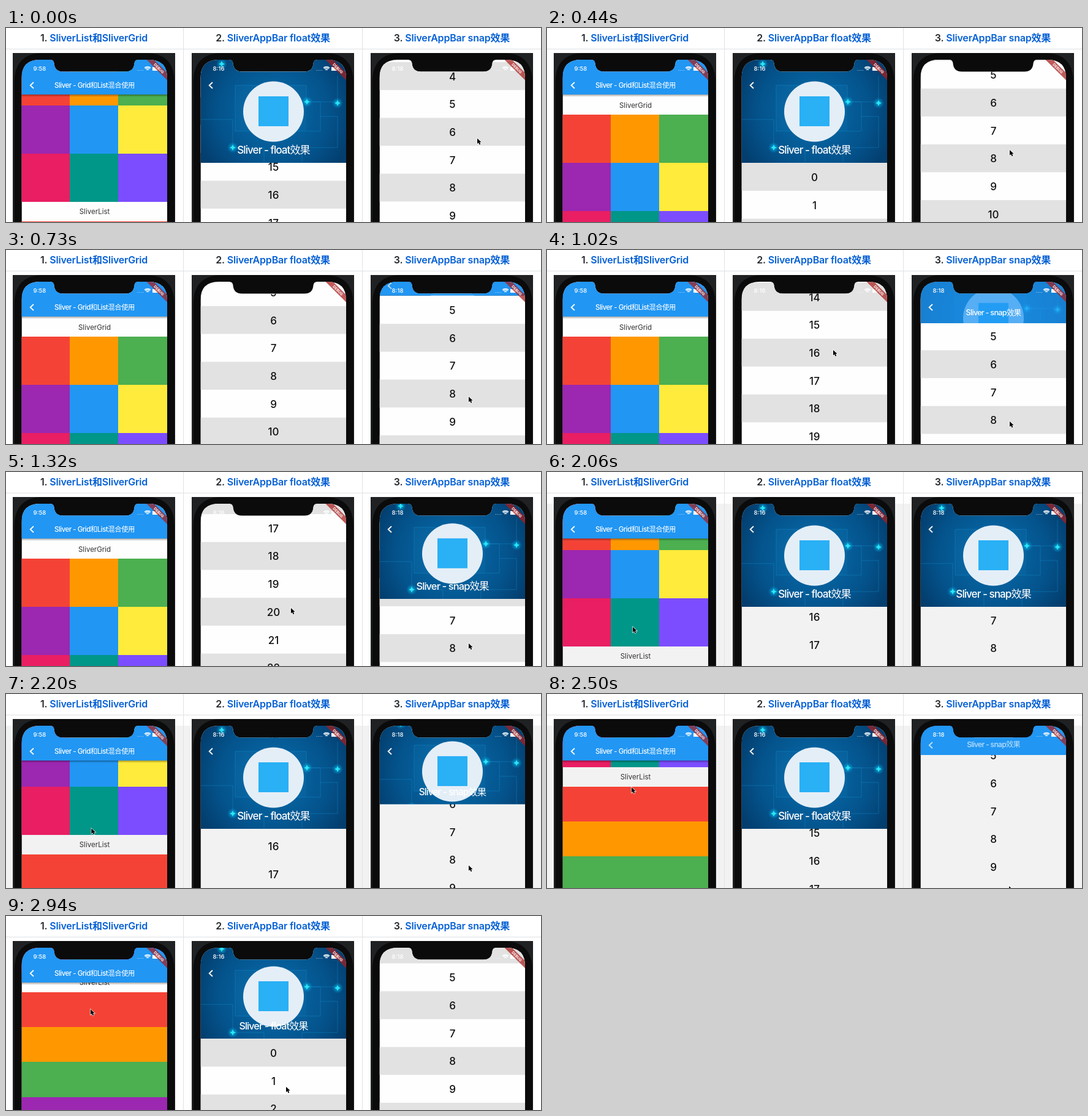
Write an HTML page with a canvas that moves like this. It is 873 px wide and 318 px high and loops after 3.04 s.

```html
<!DOCTYPE html>
<html lang="zh">
<head>
<meta charset="utf-8">
<title>Sliver demos</title>
<style>
  html, body { margin: 0; width: 100%; height: 100%; overflow: hidden; background: #fff; }
  canvas { display: block; width: 873px; height: 318px; }
</style>
</head>
<body>
<canvas id="stage"></canvas>
<script>
const W = 873, H = 318, LOOP = 3040, STEP = 147, LEAD = 9;
const FONT = 'Inter, "Noto Sans CJK SC", "Noto Sans CJK", sans-serif';
const COLORS = ['#f44336', '#ff9800', '#4caf50', '#9c27b0', '#2196f3',
  '#ffeb3b', '#e91e63', '#009688', '#7c4dff'];
const BLUE = '#2196f3', LINE = '#dfe2e5';
const TOP = 52, COLLAPSED = 110, EXPANDED = 221, ROW = 45.7;
const LEFT = 14.5, WIDTH = 237.5, MID = 133.5;

const canvas = document.getElementById('stage');
const ctx = canvas.getContext('2d');
const ratio = window.devicePixelRatio || 1;
canvas.width = W * ratio;
canvas.height = H * ratio;

const clamp = (v, low, high) => Math.min(high, Math.max(low, v));

// Values at a step along a path of [step, ...values] points.
function along(path, step) {
  const next = path.findIndex(p => p[0] >= step);
  const b = path.at(next), a = path[Math.max(0, next < 0 ? path.length - 1 : next - 1)];
  const k = a === b ? 0 : (step - a[0]) / (b[0] - a[0]);
  return a.slice(1).map((v, i) => v + (b[i + 1] - v) * k);
}

const gridScroll = step => along([[0, 94], [3, 0], [12, 0], [14, 93], [17, 259], [20, 286]], step)[0];
const floatScroll = step => along([[0, 702], [3, 0], [7, 807], [9, 929], [12, 929],
  [14, 738], [17, 702], [19, 0], [20, 20]], step)[0];
const snapScroll = step => along([[0, 348], [3, 396], [4, 396], [7, 331], [9, 321], [14, 321], [17, 372]], step)[0];

// A floating bar follows every scroll movement within its own height.
function floatBar(step) {
  let bottom = EXPANDED;
  for (let i = 1; i <= step; i++) {
    bottom = clamp(bottom + floatScroll(i - 1) - floatScroll(i), TOP, EXPANDED);
  }
  return bottom;
}
const snapBar = step => along([[4, TOP], [7, 120], [9, 208], [10, EXPANDED],
  [14, EXPANDED], [17, 100], [18, TOP]], Math.max(4, step))[0];

const gridPointer = [[[13, 129, 299], [14, 129, 254], [17, 127, 153], [20, 127, 153]]];
const floatPointer = [[[7, 164, 164], [9, 162, 223]], [[20, 154, 280]]];
const snapPointer = [[[0, 174, 181], [3, 160, 200], [7, 160, 281], [11, 160, 281]], [[15, 160, 281], [17, 159, 315]]];

function box(x, y, w, h, color) {
  ctx.fillStyle = color;
  ctx.fillRect(x, y, w, h);
}

function disc(x, y, r, color) {
  ctx.fillStyle = color;
  ctx.beginPath();
  ctx.arc(x, y, r, 0, Math.PI * 2);
  ctx.fill();
}

function label(text, x, y, size, color, { weight = 400, spacing = 0, align = 'center' } = {}) {
  ctx.font = `${weight} ${size}px ${FONT}`;
  ctx.letterSpacing = `${spacing * size}px`;
  ctx.textAlign = align;
  ctx.fillStyle = color;
  ctx.fillText(text, x, y + size * 0.36);
}

function line(d, color, width) {
  ctx.strokeStyle = color;
  ctx.lineWidth = width;
  ctx.stroke(new Path2D(d));
}

function heading(number, link, center) {
  const style = { weight: 600, align: 'left', spacing: -0.012 };
  ctx.font = `600 16px ${FONT}`;
  ctx.letterSpacing = `${style.spacing * 16}px`;
  const lead = ctx.measureText(number).width;
  const x = center - (lead + ctx.measureText(link).width) / 2;
  label(number, x, 16.3, 16, '#24292e', style);
  label(link, x + lead, 16.3, 16, '#0560d5', style);
}

function backArrow(y) {
  line(`M34 ${y - 5}L28.7 ${y}L34 ${y + 5}`, '#fff', 1.8);
}

function sparkle(x, y) {
  const glow = ctx.createRadialGradient(x, y, 0, x, y, 9);
  glow.addColorStop(0, 'rgba(0,229,255,.7)');
  glow.addColorStop(1, 'rgba(0,190,255,0)');
  box(x - 9, y - 9, 18, 18, glow);
  ctx.fillStyle = '#2ce6f8';
  ctx.fill(new Path2D(`M${x} ${y - 5}l1.5 3.5 3.5 1.5-3.5 1.5-1.5 3.5-1.5-3.5-3.5-1.5 3.5-1.5z`));
}

function backdrop() {
  const sky = ctx.createRadialGradient(MID, 137, 35, MID, 137, 135);
  sky.addColorStop(0, '#0664a1');
  sky.addColorStop(0.55, '#04538c');
  sky.addColorStop(1, '#033e6e');
  box(LEFT, TOP - 30, WIDTH, EXPANDED - TOP + 60, sky);
  line('M71 94H187V121H210V169H71ZM15 150H67V196H118V220M187 121H238V78M210 145H238V196H180V220',
    'rgba(20,145,205,.4)', 1);
  box(71, 94, 116, 75, 'rgba(30,150,215,.08)');
  [[67, 196], [188, 121], [238, 123], [49, 59]].forEach(p => sparkle(...p));
  disc(MID, 137, 49.5, '#e4eef7');
  box(109, 112, 49, 49, '#29b0f5');
}

function flexibleBar(bottom, title) {
  if (bottom <= TOP) return;
  const open = Math.max(0, (bottom - COLLAPSED) / (EXPANDED - COLLAPSED));
  const fade = clamp((bottom - COLLAPSED) / 36, 0, 1);
  ctx.save();
  ctx.beginPath();
  ctx.rect(LEFT, TOP, WIDTH, bottom - TOP);
  ctx.clip();
  ctx.save();
  ctx.translate(0, (Math.max(bottom, COLLAPSED) - EXPANDED) / 4);
  backdrop();
  ctx.restore();
  ctx.globalAlpha = 1 - fade;
  box(LEFT, TOP, WIDTH, bottom - TOP, BLUE);
  ctx.globalAlpha = bottom < COLLAPSED ? 0.7 : 1;
  label(title, MID, bottom - 17.5 - 3.5 * open, 12.1 + 5 * open, '#fff', { spacing: -0.056, weight: 500 });
  backArrow(94 + Math.min(0, bottom - COLLAPSED));
  ctx.restore();
}

function numberList(scroll, flat) {
  const first = Math.max(0, Math.floor((scroll - 244) / ROW));
  for (let i = first; i < first + 9; i++) {
    const y = 244 - scroll + i * ROW;
    if (!flat && i % 2 === 0) box(LEFT, y - ROW / 2, WIDTH, ROW, '#e2e2e2');
    label(i, MID, y + 0.7, 17, '#111', { weight: 500 });
  }
}

function gridPage(step) {
  const y = COLLAPSED + 1 - Math.round(gridScroll(step));
  const gridTop = y + 31, cell = 79, listHead = gridTop + 3 * cell;
  label('SliverGrid', MID, y + 15.5, 11.5, '#333');
  COLORS.forEach((color, i) => {
    const x = 14 + i % 3 * cell;
    box(x, gridTop + Math.floor(i / 3) * cell, cell + 1, cell, color);
    box(LEFT, listHead + 32 + Math.round(i * 57.2), WIDTH, 58, color);
  });
  label('SliverList', MID, listHead + 16, 11.5, '#333');
  box(LEFT, TOP, WIDTH, COLLAPSED - TOP - 1, BLUE);
  const shade = ctx.createLinearGradient(0, COLLAPSED - 1, 0, COLLAPSED + 3);
  shade.addColorStop(0, 'rgba(0,0,0,.35)');
  shade.addColorStop(1, 'rgba(0,0,0,0)');
  box(LEFT, COLLAPSED - 1, WIDTH, 4, shade);
  label('Sliver - Grid和List混合使用', MID, 93.7, 11.4, '#fff', { spacing: -0.04, weight: 500 });
  backArrow(94);
}

function floatPage(step, flat) {
  numberList(floatScroll(step), flat);
  flexibleBar(floatBar(step), 'Sliver - float效果');
}

function snapPage(step, flat) {
  numberList(snapScroll(step), flat);
  flexibleBar(snapBar(step), 'Sliver - snap效果');
}

function statusBar(clock) {
  label(clock, 44, 67, 9.6, '#fff', { weight: 500 });
  for (let i = 0; i < 4; i++) disc(204 + i * 2.8, 69.5, 0.6, 'rgba(255,255,255,.75)');
  for (const r of [2.5, 5, 7]) {
    ctx.strokeStyle = '#fff';
    ctx.lineWidth = 1.4;
    ctx.beginPath();
    ctx.arc(220, 70.5, r, -Math.PI * 0.75, -Math.PI * 0.25);
    ctx.stroke();
  }
  box(228, 64, 11, 6, '#fff');
}

function debugBanner() {
  ctx.save();
  ctx.translate(238.7, 66.2);
  ctx.rotate(Math.PI / 4);
  box(-40, -4.3, 80, 8.6, 'rgba(170,28,28,.72)');
  label('DEBUG', 0, 0, 6, '#fff', { weight: 700 });
  ctx.restore();
}

function pointer(x, y) {
  const arrow = new Path2D('M0 0V10L2.4 7.9L4.1 11.6L6 10.8L4.4 7.2H7.6Z');
  ctx.save();
  ctx.translate(x, y);
  ctx.scale(0.88, 0.88);
  ctx.strokeStyle = '#fff';
  ctx.lineWidth = 1.4;
  ctx.stroke(arrow);
  ctx.fillStyle = '#000';
  ctx.fill(arrow);
  ctx.restore();
}

const BODY = new Path2D('M2.5 318V90Q2.5 41 50 41H217Q264 41 264 90V318Z');
const SCREEN = new Path2D('M14.5 318V82Q14.5 52 44 52H61Q67 52 67.5 58Q68.5 71.5 82 71.5' +
  'H184Q197.5 71.5 198.5 58Q199 52 205 52H222Q252 52 252 82V318Z');

function phone(x, clock, page, pointerPaths, step, flat) {
  ctx.save();
  ctx.translate(x, 0);
  ctx.beginPath();
  ctx.rect(0, 41, 265, H - 41);
  ctx.clip();
  box(0, 41, 265, H - 41, '#1f2123');
  ctx.fillStyle = '#0b0b0c';
  ctx.fill(BODY);
  ctx.clip(SCREEN);
  box(LEFT, TOP, WIDTH, H - TOP, flat ? '#f2f2f2' : '#fefefe');
  page(step, flat);
  statusBar(clock);
  debugBanner();
  const path = pointerPaths.find(p => step >= p[0][0] && step <= p.at(-1)[0]);
  if (path) pointer(...along(path, step));
  ctx.restore();
}

function draw(step) {
  const flat = step >= 13 && step <= 17;
  ctx.setTransform(ratio, 0, 0, ratio, 0, 0);
  box(0, 0, W, H, '#fff');
  if (flat) box(0, TOP, W, H - TOP, '#f2f2f2');
  box(0, 34, W, 1, LINE);
  box(289, 0, 1, H, LINE);
  box(581, 0, 1, H, LINE);
  heading('1. ', 'SliverList和SliverGrid', 143.5);
  heading('2. ', 'SliverAppBar float效果', 435.5);
  heading('3. ', 'SliverAppBar snap效果', 727.5);
  phone(11, '9:58', gridPage, gridPointer, step, flat);
  phone(303, '8:16', floatPage, floatPointer, step, flat);
  phone(595, '8:18', snapPage, snapPointer, step, flat);
}

const start = performance.now();
function tick() {
  const time = (performance.now() - start) % LOOP;
  draw(Math.floor((time + LEAD) / STEP));
  requestAnimationFrame(tick);
}
tick();
</script>
</body>
</html>
```
